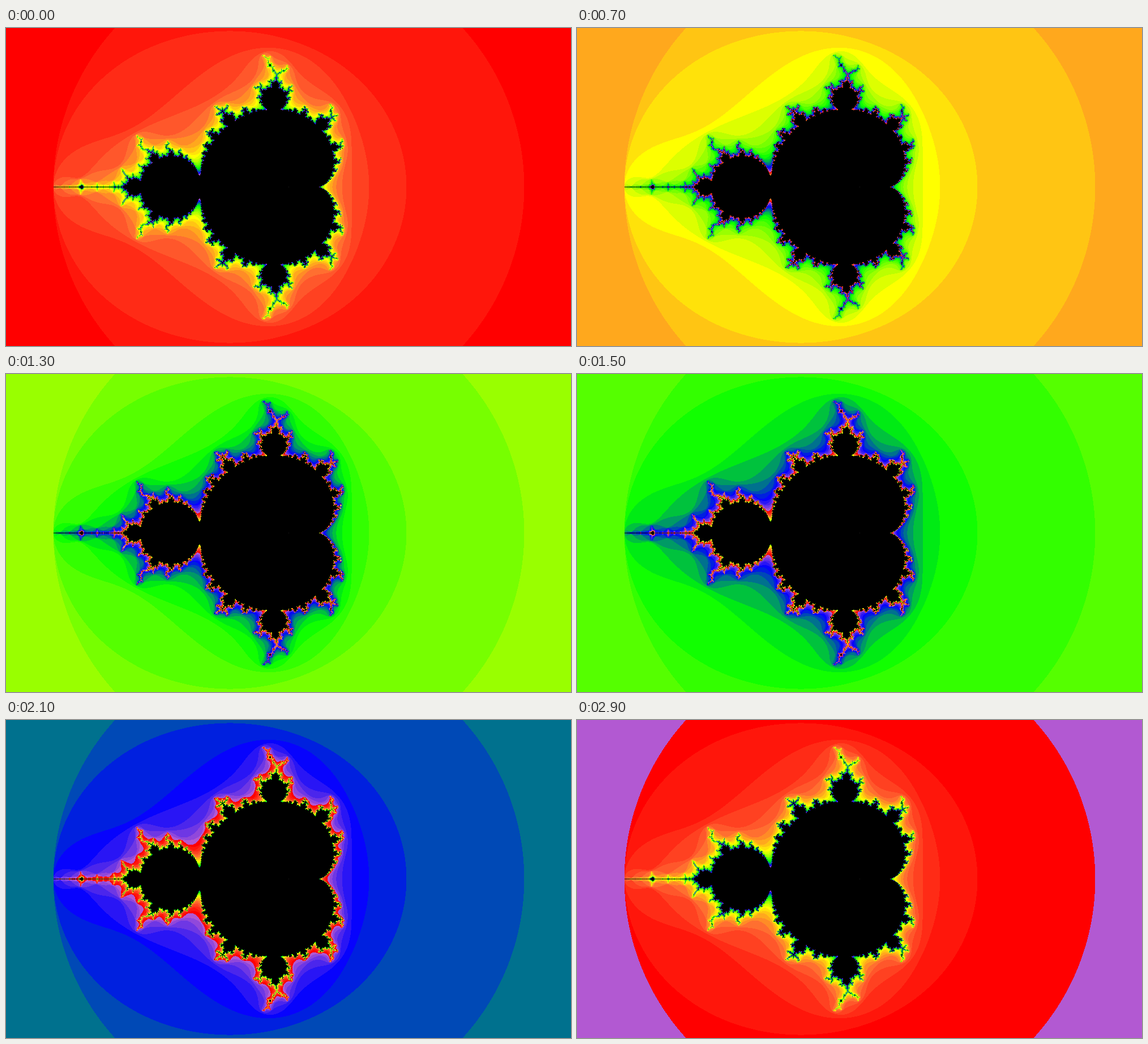
Write an HTML page with a canvas that moves like this. It is 998 px wide and 561 px high and loops after 3000 ms.

```html
<!DOCTYPE html>
<html lang="en">
<head>
<meta charset="utf-8">
<title>Mandelbrot colour cycle</title>
<style>
  html, body { margin: 0; width: 100%; height: 100%; overflow: hidden; background: #f00; }
  canvas { display: block; width: 998px; height: 561px; }
</style>
</head>
<body>
<canvas id="stage" width="998" height="561"></canvas>
<script>
const W = 998, H = 561;
const STEPS = 30;      // palette size, iteration limit and steps per loop
const STEP_MS = 100;
const UNIT = 4.8 / W;  // plane units per pixel

// Gradient stops: position, red, green, blue
const STOPS = [
  [0, 255, 0, 0],
  [4.7, 255, 102, 51],
  [10, 255, 255, 0],
  [17.5, 0, 255, 0],
  [23.8, 0, 0, 255],
  [29.75, 204, 102, 204]
];

const rgba = (r, g, b) => (255 << 24 | b << 16 | g << 8 | r) >>> 0;

function gradient(pos) {
  const i = STOPS.findIndex(s => s[0] > pos);
  const a = STOPS[i - 1], b = STOPS[i];
  const t = (pos - a[0]) / (b[0] - a[0]);
  const mix = k => Math.round(a[k] + (b[k] - a[k]) * t);
  return rgba(mix(1), mix(2), mix(3));
}

// Iterations before escape; STEPS means the point stays bounded
function escapeTime(cx, cy) {
  let x = cx, y = cy, n = 0;
  while (n < STEPS && x * x + y * y <= 4) {
    const next = x * x - y * y + cx;
    y = 2 * x * y + cy;
    x = next;
    n++;
  }
  return n;
}

const palette = Array.from({ length: STEPS }, (_, i) => gradient(i));
const BLACK = rgba(0, 0, 0);
const levels = new Uint8Array(W * H);
for (let py = 0; py < H; py++) {
  for (let px = 0; px < W; px++) {
    levels[py * W + px] = escapeTime((px - 499) * UNIT, (py - 280) * UNIT);
  }
}

const ctx = document.getElementById("stage").getContext("2d");
const image = ctx.createImageData(W, H);
const pixels = new Uint32Array(image.data.buffer);
let shown = -1;

function draw(shift) {
  const colors = palette.map((_, n) => palette[(n + shift) % STEPS]);
  colors.push(BLACK);
  for (let i = 0; i < pixels.length; i++) pixels[i] = colors[levels[i]];
  pixels[280 * W + 499] = rgba(34, 34, 34); // faint dot at the origin
  ctx.putImageData(image, 0, 0);
}

let start = null;
function tick(now) {
  if (start === null) start = now;
  const shift = Math.floor(Math.max(0, now - start) / STEP_MS) % STEPS;
  if (shift !== shown) draw(shown = shift);
  requestAnimationFrame(tick);
}

draw(shown = 0);
requestAnimationFrame(tick);
</script>
</body>
</html>
```
